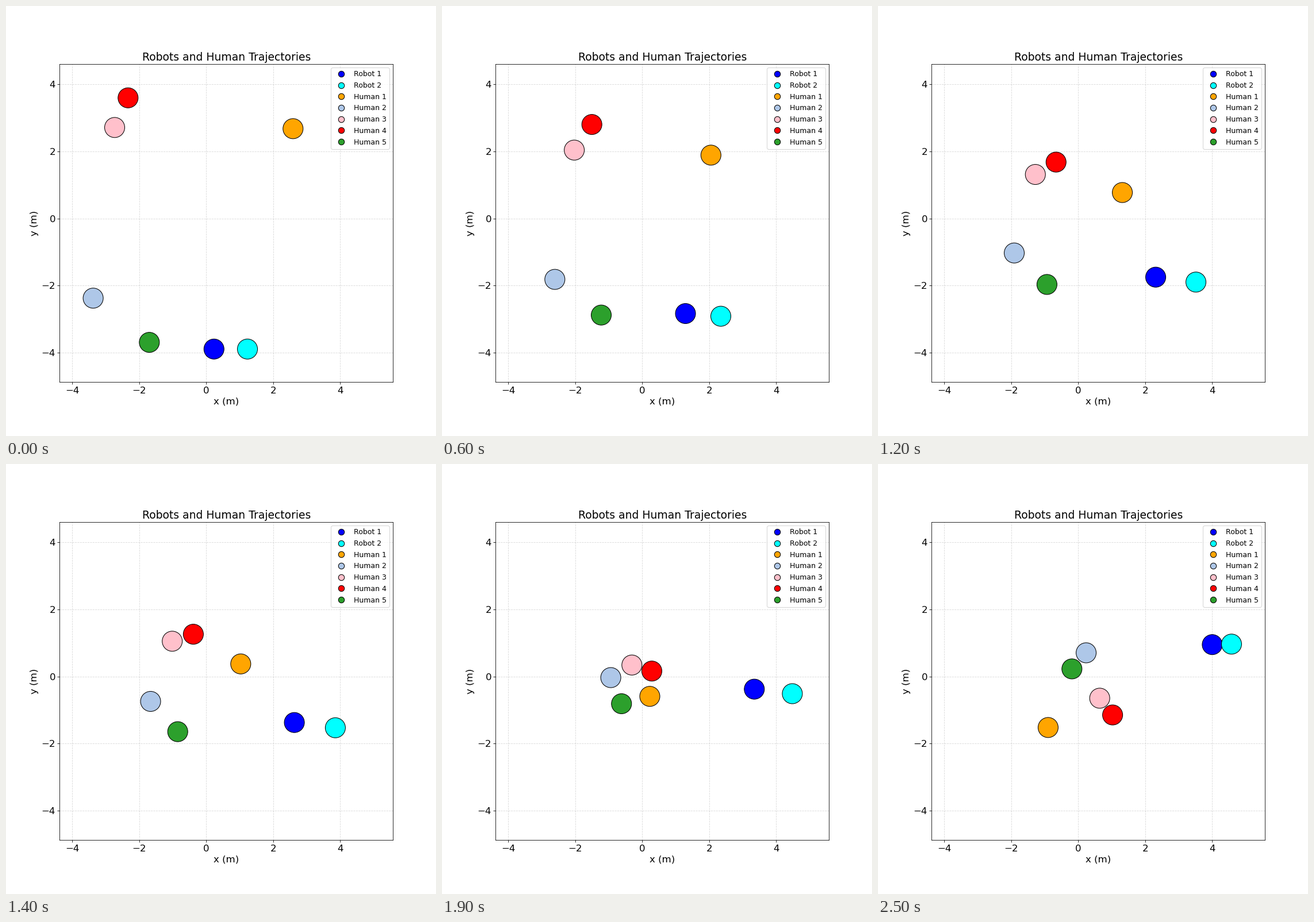
These frames come from a looping animation (748 by 748 pixels, 2600 ms). A matplotlib script:

```python
import numpy as np
import matplotlib.pyplot as plt
from matplotlib.animation import FuncAnimation
from matplotlib.lines import Line2D

FRAMES, INTERVAL = 26, 100
RADIUS = 0.3
KEY_TIMES = [0, 6, 19, 25]

# name: (colour, positions in metres at the key times)
AGENTS = {
    "Robot 1": ("blue", [(0.23, -3.90), (1.29, -2.84), (3.345, -0.38), (4.0, 0.95)]),
    "Robot 2": ("cyan", [(1.23, -3.90), (2.345, -2.92), (4.48, -0.515), (4.575, 0.965)]),
    "Human 1": ("orange", [(2.59, 2.68), (2.05, 1.89), (0.225, -0.595), (-0.90, -1.525)]),
    "Human 2": ("#aec7e8", [(-3.377, -2.38), (-2.61, -1.82), (-0.94, -0.035), (0.235, 0.705)]),
    "Human 3": ("pink", [(-2.735, 2.715), (-2.03, 2.04), (-0.31, 0.34), (0.64, -0.65)]),
    "Human 4": ("red", [(-2.335, 3.60), (-1.505, 2.805), (0.285, 0.16), (1.025, -1.15)]),
    "Human 5": ("tab:green", [(-1.70, -3.70), (-1.225, -2.885), (-0.62, -0.815), (-0.19, 0.225)]),
}


def cubic_path(points):
    """Cubic curve in time through the key points, sampled once per frame."""
    coefficients = np.polyfit(KEY_TIMES, points, 3)
    return np.vander(np.arange(FRAMES), 4) @ coefficients


fig, ax = plt.subplots(figsize=(10, 10), dpi=74.8)
fig.subplots_adjust(left=0.1248)
ax.set_aspect("equal")
ax.set_xlim(-4.377, 5.575)
ax.set_ylim(-4.891, 4.609)
ax.set_xticks(range(-4, 5, 2))
ax.set_yticks(range(-4, 5, 2))
ax.tick_params(labelsize=16)
ax.set_xlabel("x (m)", fontsize=16)
ax.set_ylabel("y (m)", fontsize=16)
ax.set_title("Robots and Human Trajectories", fontsize=18)
ax.grid(True, linestyle="--", alpha=0.5)

paths, circles, handles = [], [], []
for name, (color, points) in AGENTS.items():
    paths.append(cubic_path(points))
    circles.append(ax.add_patch(plt.Circle(points[0], RADIUS, facecolor=color,
                                           edgecolor="black", zorder=3)))
    handles.append(Line2D([], [], marker="o", linestyle="none", markersize=10,
                          markerfacecolor=color, markeredgecolor="black", label=name))
ax.legend(handles=handles, loc="upper right", fontsize=12, labelspacing=0.54)


def update(frame):
    for circle, path in zip(circles, paths):
        circle.center = path[frame]
    return circles


anim = FuncAnimation(fig, update, frames=FRAMES, interval=INTERVAL, repeat=True, repeat_delay=0)
plt.show()
```
